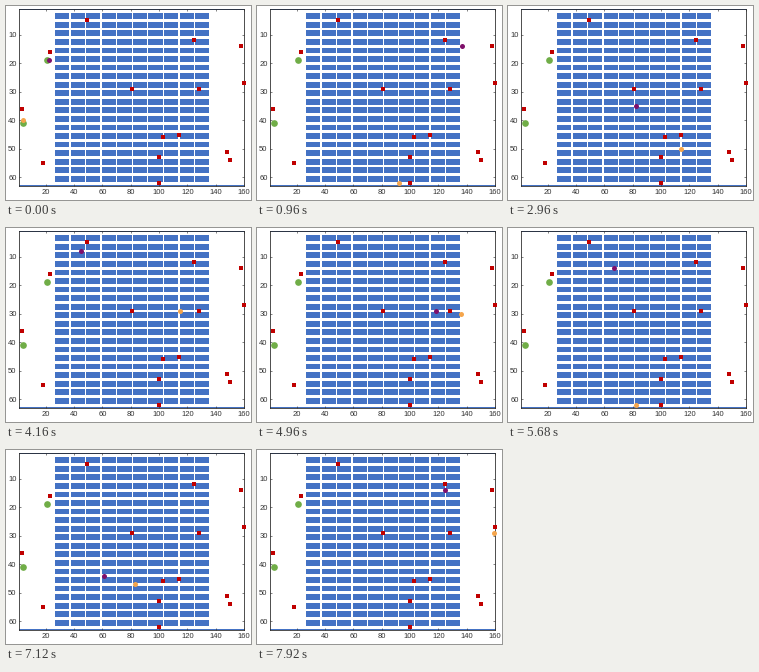
A matplotlib script for the animation above (8000 ms loop, 245x194 px).

```python
import numpy as np
import matplotlib.pyplot as plt
from matplotlib.animation import FuncAnimation
from matplotlib.patches import Rectangle

W, H, DPI = 245, 194, 100
FRAMES, INTERVAL, CELLS_PER_FRAME = 100, 80, 10
PX = 72 / DPI
LEFT, TOP, RIGHT, BOTTOM = 13, 3, 238, 180
COLS, ROWS = 160, 63

BLUE, RED, GREEN = "#4472c4", "#c00000", "#70ad47"
PURPLE, ORANGE = "#7f0f6a", "#f5a54c"

AISLE_COLS = range(26, 137, 11)
AISLE_ROWS = range(2, 63, 3)

# Pick-up stations on the warehouse floor.
A, B, C, D, E = (49, 5), (23, 16), (3, 36), (18, 55), (81, 29)
F, G, I, J, K = (125, 12), (128, 29), (158, 14), (160, 27), (114, 45)
L, M, N, P, Q = (103, 46), (100, 53), (100, 62), (148, 51), (150, 54)
STATIONS = [A, B, C, D, E, F, G, I, J, K, L, M, N, P, Q]
HOMES = [(21, 19), (4, 41)]

# Errands in order; bare points are places passed on the way.
PURPLE_STOPS = [HOMES[0], I, L, Q, (3, 35), C, (48, 8), A, (114, 14), (114, 29),
                G, F, (4, 14), (4, 20), A, K, (125, 14)]
ORANGE_STOPS = [HOMES[1], C, (92, 59), N, (158, 62), I, J, G, P, Q, (114, 53), K,
                P, I, (114, 29), K, P, Q, E, N, D, K, J, (158, 29)]


def between(options, start, end):
    """The options from start to end, in travel order."""
    inside = [v for v in options if min(start, end) <= v <= max(start, end)]
    return inside if start <= end else inside[::-1]


def route(start, goal):
    """Corners of the way: enter an aisle, change row, cross over, leave."""
    (x0, y0), (x1, y1) = start, goal
    cols = between(AISLE_COLS, x0, x1)
    rows = between(AISLE_ROWS, y0, y1)
    enter, leave = (cols[0], cols[-1]) if cols else (x0, x1)
    row = rows[-1] if rows else y0
    return [(enter, y0), (enter, row), (leave, row), (leave, y1), goal]


def walk(stops):
    """Position in every frame, at one steady pace through all stops."""
    corners = [stops[0]]
    for start, goal in zip(stops, stops[1:]):
        corners += route(start, goal)
    corners = np.array(corners)
    steps = np.abs(np.diff(corners, axis=0)).sum(axis=1)
    travelled = np.r_[0, np.cumsum(steps)]
    now = np.arange(FRAMES) * CELLS_PER_FRAME + 1
    return np.column_stack([np.interp(now, travelled, axis) for axis in corners.T])


plt.rcParams["font.family"] = "Liberation Sans"
fig = plt.figure(figsize=(W / DPI, H / DPI), dpi=DPI, facecolor="white")
ax = fig.add_axes([LEFT / W, 1 - BOTTOM / H, (RIGHT - LEFT) / W, (BOTTOM - TOP) / H])
ax.set(xlim=(1, COLS), ylim=(ROWS, 1),
       xticks=range(20, 161, 20), yticks=range(10, 61, 10))
ax.tick_params(direction="in", top=True, right=True, length=2 * PX,
               width=0.6 * PX, labelsize=7.7 * PX, pad=2.4 * PX, colors="#333333")
ax.tick_params(axis="x", pad=3.2 * PX)
for spine in ax.spines.values():
    spine.set(linewidth=0.8 * PX, color="#262626")


def block(x, y, width, height):
    ax.add_patch(Rectangle((x - 0.5, y - 0.5), width, height, fc=BLUE, lw=0))


for wall in (1, ROWS):
    block(1, wall, COLS, 1)
for col in AISLE_COLS[:-1]:
    for row in AISLE_ROWS[:-1]:
        block(col + 1, row + 1, 10, 2)


def dots(points, shape, size, color, z):
    x, y = np.array(points).T
    return ax.plot(x, y, shape, ms=size * PX, mfc=color, mew=0, ls="",
                   zorder=z, clip_on=False)[0]


dots(HOMES, "o", 6.7, GREEN, 4)
dots(STATIONS, "s", 4, RED, 5)
robots = []
for stops, color in ((ORANGE_STOPS, ORANGE), (PURPLE_STOPS, PURPLE)):
    path = walk(stops)
    robots.append((dots(path[:1], "o", 5, color, 6), path))


def update(frame):
    for marker, path in robots:
        marker.set_data(path[frame, :1], path[frame, 1:])
    return [marker for marker, _ in robots]


anim = FuncAnimation(fig, update, frames=FRAMES, interval=INTERVAL,
                     repeat=True, repeat_delay=0)
plt.show()
```
